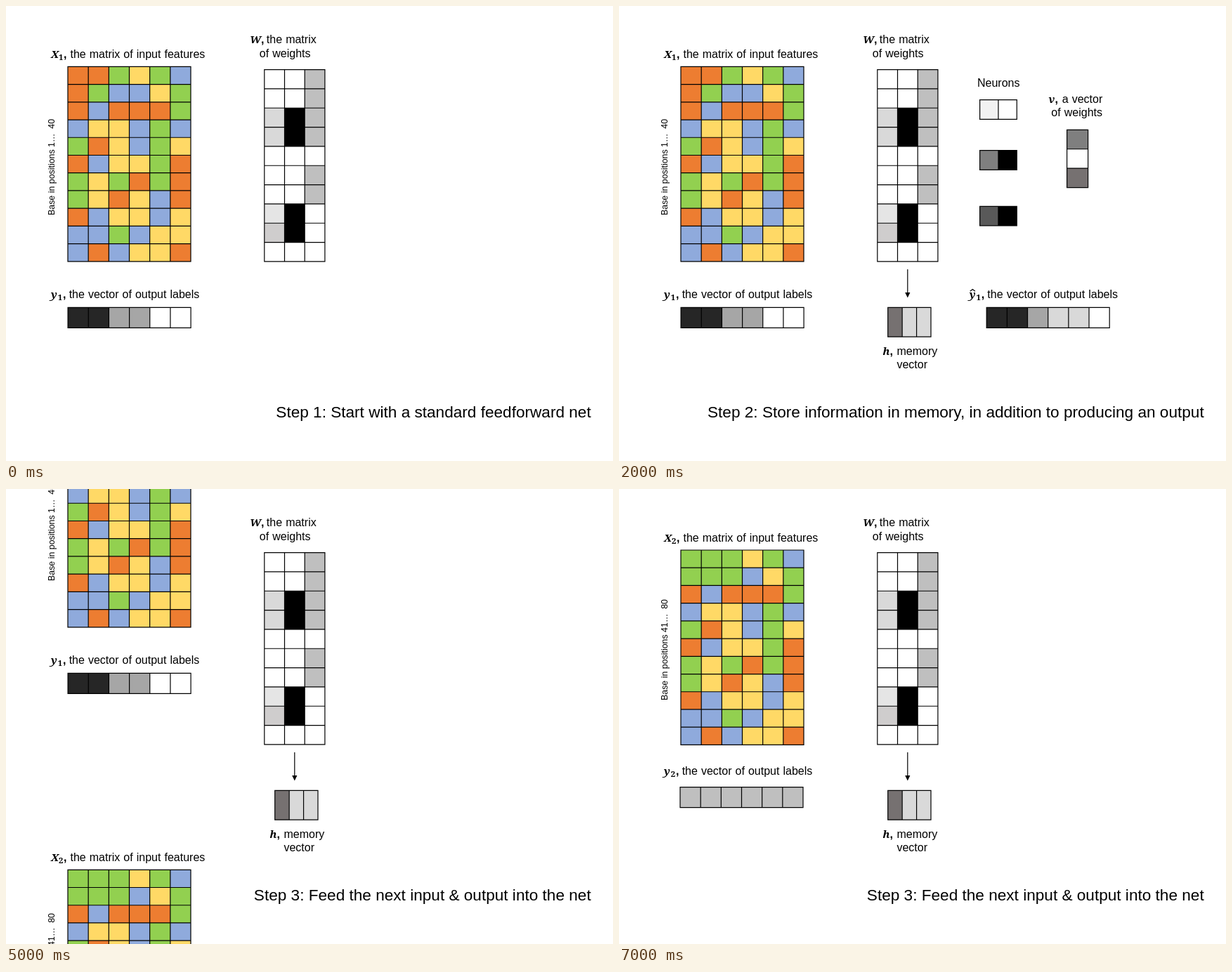
An HTML page that plays this animation: 864 by 648 pixels, repeating every 8 s.

```html
<!DOCTYPE html>
<html lang="en">
<head>
<meta charset="utf-8">
<title>Recurrent net, step by step</title>
<style>
  html, body { margin: 0; width: 100%; height: 100%; overflow: hidden; background: #fff; }
  svg { display: block; width: 864px; height: 648px; }
  text { font: 16px "Liberation Sans", Arial, sans-serif; word-spacing: .6px; white-space: pre; }
  .sym { font: italic bold 15px "Noto Serif", serif; }
  .sub { font: bold 11.5px "Noto Serif", serif; }
  .comma { font-weight: bold; }
  .axis { font-size: 12.4px; word-spacing: 0; }
  .step { font-size: 22.6px; word-spacing: 0; }
  .end { text-anchor: end; }
  .lines { stroke: #000; stroke-width: 1.2; stroke-linecap: square; fill: none; }
  rect { shape-rendering: crispEdges; }
</style>
</head>
<body>
<svg id="stage" viewBox="0 0 864 648"></svg>
<script>
const COLORS = {
  O: '#ed7d31', G: '#92d050', Y: '#ffd966', B: '#8faadc',
  w: '#fff', k: '#000', d: '#262626', a: '#a6a6a6', l: '#d9d9d9', s: '#bfbfbf',
  e: '#e5e5e5', c: '#cfcdcd', f: '#f2f2f2', m: '#7f7f7f', n: '#595959', t: '#767171'
};
const BODY = ['OBOOOG', 'BYYBGB', 'GOYBGY', 'OBYYGO', 'GYGOGO', 'GYOYBO', 'OBYYBY', 'BBGBYY', 'BOBYYO'];
const INPUTS = { 1: ['OOGYGB', 'OGBBYG', ...BODY], 2: ['GGGYGB', 'GGGBYG', ...BODY] };
const WEIGHTS = ['wws', 'wws', 'lks', 'lks', 'www', 'wws', 'wws', 'ekw', 'ckw', 'www'];
const STEPS = [
  'Step 1: Start with a standard feedforward net',
  'Step 2: Store information in memory, in addition to producing an output',
  'Step 3: Feed the next input & output into the net'
];

const text = (x, y, str, cls = '') =>
  `<text x="${x}" y="${y}" class="${cls}">${str.replace('&', '&amp;')}</text>`;

function grid(x, y, w, h, rows) {
  const nx = rows[0].length, ny = rows.length, cw = w / nx, ch = h / ny;
  let cells = '', lines = '';
  rows.forEach((row, j) => [...row].forEach((key, i) => {
    cells += `<rect x="${x + i * cw}" y="${y + j * ch}" width="${cw}" height="${ch}" fill="${COLORS[key]}"/>`;
  }));
  for (let i = 0; i <= nx; i++) lines += `M${x + i * cw} ${y}v${h}`;
  for (let j = 0; j <= ny; j++) lines += `M${x} ${y + j * ch}h${w}`;
  return cells + `<path class="lines" d="${lines}"/>`;
}

// Bold math symbol, comma, then right-aligned words
const label = (x, y, sym, commaX, words, endX) =>
  text(x, y, sym, 'sym') + text(commaX, y, ',', 'comma') + text(endX, y, words, 'end');

const inputLabel = (y, n) =>
  label(64, y, 'X', 82, 'the matrix of input features', 283.3) + text(75, y + 3, n, 'sub');

const outputLabel = (x, y, n) =>
  label(x, y, 'y', x + 17, 'the vector of output labels', x + 211.3) + text(x + 9.7, y + 3, n, 'sub');

function inputColumn(n, top, axisY, range, vecX, vecY, labelY, vec) {
  return inputLabel(top - 12.2, n) + grid(88, top, 175, 277.4, INPUTS[n]) +
    `<g transform="translate(68.7 ${axisY}) rotate(-90)">${text(0, 0, 'Base in positions ' + range, 'axis')}</g>` +
    outputLabel(64, labelY, n) + grid(vecX, vecY, 175, 29, [vec]);
}

const firstColumn = dy =>
  inputColumn('1', 86.4 + dy, 298 + dy, '1…\u00a0 40', 88.1, 429.3 + dy, 416 + dy, 'ddaaww');

const secondColumn = (top, axisY, vecY, vec) =>
  inputColumn('2', top, axisY, '41…\u00a0 80', 87, vecY, vecY - 17.4, vec);

const weights = () =>
  label(347, 53, 'W', 363, 'the matrix', 441.7) + text(433.5, 73, 'of weights', 'end') +
  grid(367.8, 90.6, 86.1, 273.3, WEIGHTS);

const network = () =>
  text(510, 115, 'Neurons') +
  grid(513.6, 133.7, 52.7, 27.6, ['fw']) +
  grid(513.6, 205.7, 52.7, 27.6, ['mk']) +
  grid(513.6, 285.3, 52.7, 27.6, ['nk']) +
  label(611.5, 138, 'v', 620.5, 'a vector', 688.3) + text(688, 157, 'of weights', 'end') +
  grid(637.6, 176.3, 30, 82.3, ['m', 'w', 't']) +
  outputLabel(498.7, 416, '1') +
  '<path d="M499.7 406.3l3.6-2.8 3.6 2.8" fill="none" stroke="#000" stroke-width="1.2"/>' +
  grid(523.2, 429.3, 175, 29, ['ddallw']);

const memory = () =>
  '<path d="M410.8 375V409" stroke="#000" stroke-width="1.2"/><path d="M407.2 408h7.2l-3.6 7.5z"/>' +
  grid(382.7, 429.3, 61.3, 41.8, ['tll']) +
  label(375.5, 496.5, 'h', 385.5, 'memory', 453.3) + text(439, 516, 'vector', 'end');

function inputs(phase) {
  if (phase < 4) return firstColumn(0);
  if (phase === 4) return firstColumn(-167) + secondColumn(542.3, 748, 880, 'llllll');
  if (phase === 5) return firstColumn(-433) + secondColumn(246.3, 461, 584.2, 'llllll');
  return secondColumn(87, 301, 424.6, 'ssssss');
}

function scene(phase) {
  const step = phase < 2 ? 0 : phase === 2 ? 1 : 2;
  return inputs(phase) + weights() +
    (phase === 1 || phase === 2 ? network() : '') +
    (phase >= 2 ? memory() : '') +
    text(832.7, 586, STEPS[step], 'step end');
}

const LOOP = 8000, STARTS = [0, 1000, 2000, 4000, 5000, 6000, 7000];
const stage = document.getElementById('stage');
const origin = performance.now();
let shown = -1;

function tick() {
  const t = (performance.now() - origin) % LOOP;
  const phase = STARTS.filter(start => start <= t).length - 1;
  if (phase !== shown) stage.innerHTML = scene(shown = phase);
  requestAnimationFrame(tick);
}
tick();
</script>
</body>
</html>
```
